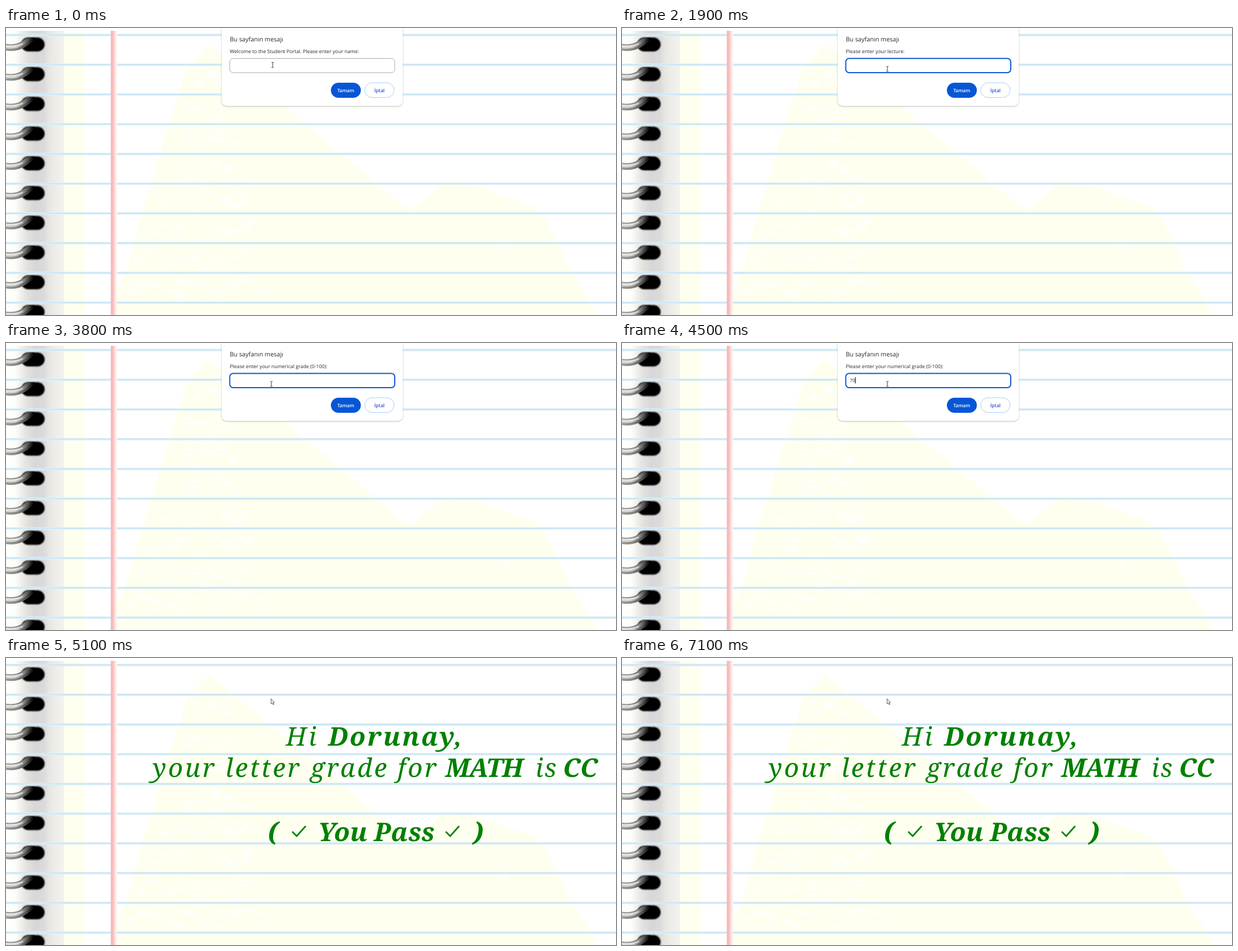
Recreate the animation shown at these times as an HTML page. Size 1089 px wide and 514 px high, loop 7.2 s.

```html
<!DOCTYPE html>
<html lang="tr">
<head>
<meta charset="utf-8">
<title>Student Portal</title>
<style>
  html, body { margin: 0; width: 100%; height: 100%; overflow: hidden; background: #fff; }
  svg { display: block; width: 100%; height: 100%; }
  text { text-rendering: geometricPrecision; white-space: pre; }
  .ui { font-family: "Open Sans", "Noto Sans", sans-serif; fill: #26282b; }
  .button { font-size: 8.5px; font-weight: 600; text-anchor: middle; }
  .note { font: italic 46px "Noto Serif", "Liberation Serif", serif; fill: #008000; text-anchor: middle; }
  .bold { font-weight: 700; }
</style>
</head>
<body>
<svg viewBox="0 0 1089 514" preserveAspectRatio="none">
  <defs>
    <linearGradient id="spine" gradientUnits="userSpaceOnUse" x1="0" x2="104" y1="0" y2="0">
      <stop offset="0" stop-color="#fff"/>
      <stop offset=".17" stop-color="#fdfdf8"/>
      <stop offset=".24" stop-color="#f3f2ed"/>
      <stop offset=".36" stop-color="#e3e2de"/>
      <stop offset=".5" stop-color="#d8d6d8"/>
      <stop offset=".66" stop-color="#dbdbd9"/>
      <stop offset=".75" stop-color="#e9e8e4"/>
      <stop offset="1" stop-color="#f3f3ef"/>
    </linearGradient>
    <linearGradient id="margin">
      <stop offset="0" stop-color="#f9b9b9"/>
      <stop offset=".45" stop-color="#fbbdbd"/>
      <stop offset=".6" stop-color="#fbdcd8"/>
      <stop offset="1" stop-color="#fff6f2"/>
    </linearGradient>
    <linearGradient id="ringEdge" gradientUnits="userSpaceOnUse" x1="0" x2="50" y1="0" y2="0">
      <stop offset="0" stop-color="#9a9a98"/>
      <stop offset=".4" stop-color="#858583"/>
      <stop offset=".75" stop-color="#494948"/>
      <stop offset="1" stop-color="#000"/>
    </linearGradient>
    <linearGradient id="ringShine" gradientUnits="userSpaceOnUse" x1="0" x2="48" y1="0" y2="0">
      <stop offset="0" stop-color="#d6d6d4"/>
      <stop offset=".35" stop-color="#d0d0ce"/>
      <stop offset=".65" stop-color="#8b8b89"/>
      <stop offset="1" stop-color="#111"/>
    </linearGradient>
    <filter id="soft" x="-20%" y="-20%" width="140%" height="140%">
      <feGaussianBlur stdDeviation=".8"/>
    </filter>
    <filter id="shadow" x="-5%" y="-10%" width="110%" height="120%">
      <feDropShadow dx="0" dy="1" stdDeviation="1.3" flood-color="#55553c" flood-opacity=".45"/>
    </filter>
    <clipPath id="ringClip">
      <path d="M-5 20H27V17H56A13 13 0 0 1 56 42H-5Z"/>
    </clipPath>
    <g id="hole">
      <rect x="27" y="17" width="42" height="25" rx="12.5" filter="url(#soft)"/>
      <g clip-path="url(#ringClip)" fill="none">
        <path d="M-4 34C14 37 28 36 48 15" stroke="url(#ringEdge)" stroke-width="12"/>
        <path d="M-4 33C14 36 27 34 45 16" stroke="url(#ringShine)" stroke-width="6"/>
        <path d="M-4 32C12 34 22 33 30 28" stroke="#f4f4f2" stroke-width="1.5" opacity=".8"/>
      </g>
    </g>
  </defs>

  <rect width="1089" height="514" fill="#fff"/>
  <g id="paper">
    <rect x="104" y="5" width="37" height="509" fill="#fffff0"/>
    <path fill="#fffff0" d="M362 29L323 70L310 115L278 213L265 262L243 328L228 385L216 430L198 470V514H1055L1040 485L1008 435L983 380L959 334L945 320L845 284L787 272L720 327L590 218Z"/>
    <ellipse cx="890" cy="394" rx="6" ry="4" fill="#fff"/>
    <g id="flecks" stroke="#fff" stroke-linecap="round" fill="none"/>
    <rect y="5" width="104" height="509" fill="url(#spine)"/>
    <path d="M78 5V514" stroke="#f3e3da"/>
    <g id="rules"/>
    <rect x="187" y="5" width="11" height="509" fill="url(#margin)"/>
    <g id="holes"/>
  </g>

  <g id="result">
    <text class="note" x="529" y="157" letter-spacing="4">Hi</text>
    <text class="note bold" x="696" y="157" letter-spacing="3"><tspan id="greeted"></tspan>,</text>
    <text class="note" x="517" y="213" letter-spacing="3.6">your letter grade for</text>
    <text class="note bold" x="853" y="213" letter-spacing="-1.5">MATH</text>
    <text class="note" x="965" y="213" letter-spacing="2">is</text>
    <text class="note bold" x="1025" y="213">CC</text>
    <text class="note bold" x="477" y="328">(</text>
    <text class="note bold" x="661" y="328">You Pass</text>
    <text class="note bold" x="843" y="328">)</text>
    <path d="M511 311L519 319L535 301M785 311L793 319L809 301" fill="none" stroke="#008000" stroke-width="2.8"/>
  </g>

  <g id="dialog" class="ui">
    <rect x="385" y="-20" width="323.5" height="159.5" rx="9" fill="#fff" filter="url(#shadow)"/>
    <text x="399.5" y="24" font-size="10.95" font-weight="500">Bu sayfanın mesajı</text>
    <text id="prompt" x="399.5" y="45" font-size="8.83"></text>
    <rect id="field" x="399.5" y="54.5" width="294.5" height="25.5" rx="6" fill="#fff"/>
    <text id="typed" x="406.7" y="70.3" font-size="8.3"></text>
    <path id="caret" d="M.5 61V72.5" stroke="#111" stroke-width="1"/>
    <rect x="580" y="98" width="53.5" height="27" rx="13.5" fill="#0656d6"/>
    <text class="button" x="606.5" y="114.6" fill="#fff" style="fill:#fff">Tamam</text>
    <rect x="640.5" y="98" width="52.5" height="26.5" rx="13.25" fill="#fff" stroke="#a9c8fa"/>
    <text class="button" x="666.7" y="114.6" style="fill:#2f50cc">İptal</text>
  </g>

  <path id="beam" d="M-2 -4.5H-.5L0 -4L.5 -4.5H2M0 -4V4M-2 4.5H-.5L0 4L.5 4.5H2" fill="none" stroke="#222" stroke-width=".9"/>
  <path id="arrow" d="M473.2 73V82.2L475.3 80.3L476.8 83.6L478.2 83L476.8 79.8H479.3Z" fill="#fff" stroke="#333" stroke-width=".8"/>
</svg>
<script>
const $ = id => document.getElementById(id);
const LOOP = 7200, PITCH = 53.25, ROWS = 10;
const NAME = "Dorunay";
const PROMPTS = [
  "Welcome to the Student Portal. Please enter your name:",
  "Please enter your lecture:",
  "Please enter your numerical grade (0-100):"
];

// Each step: start time, prompt index, typed text, caret shown
const STEPS = [
  [0, 0, "", false],
  [100, 0, "", true],
  [200, 0, NAME.slice(0, 1), true],
  [300, 0, NAME.slice(0, 2), true],
  [600, 0, NAME.slice(0, 3), true],
  [700, 0, NAME.slice(0, 4), true],
  [800, 0, NAME.slice(0, 5), true],
  [900, 0, NAME, true],
  [1400, 1, "", true],
  [1900, 1, "", false],
  [2400, 1, "M", true],
  [2500, 1, "MA", true],
  [2700, 1, "MAT", true],
  [2900, 1, "MATH", true],
  [3200, 2, "", true],
  [3800, 2, "", false],
  [4300, 2, "", true],
  [4400, 2, "7", true],
  [4500, 2, "70", true]
];
const FOCUS_AT = 100, CLOSE_AT = 5000, RESULT_AT = 5100;

function seeded(seed) {
  return () => (seed = (seed * 16807) % 2147483647) / 2147483647;
}

function buildPaper() {
  const rand = seeded(77);
  let rules = "", holes = "", flecks = "";
  for (let i = 0; i < ROWS; i++) {
    const top = i * PITCH;
    rules += `<rect y="${top + 10.4}" width="1089" height="4.4" fill="#e2f1f8"/>` +
             `<rect y="${top + 11.3}" width="1089" height="2.2" fill="#c9e6f5"/>`;
    holes += `<use href="#hole" y="${top}"/>`;
    if (i < 1 || i > 8) continue;
    const left = 352 - i * 18, right = 372 + i * 11;
    for (let n = 0; n < 6 + i * 3; n++) {
      const x = left + rand() * (right - left), y = top + 24 + rand() * 34;
      flecks += `<path d="M${x} ${y}q5 ${rand() * 4 - 2} ${4 + rand() * 13} ${rand() * 3}" stroke-width="${2 + rand() * 2.2}"/>`;
    }
  }
  $("rules").innerHTML = rules;
  $("holes").innerHTML = holes;
  $("flecks").innerHTML = flecks;
}

function show(id, on) {
  $(id).style.display = on ? "" : "none";
}

function draw(t) {
  const [, prompt, text, caret] = STEPS.findLast(step => step[0] <= t);
  const focused = t >= FOCUS_AT, open = t < CLOSE_AT;
  show("dialog", open);
  show("beam", open);
  show("arrow", !open);
  show("result", t >= RESULT_AT);
  if (!open) return;

  $("prompt").textContent = PROMPTS[prompt];
  $("typed").textContent = text;
  $("field").setAttribute("stroke", focused ? "#0b57d0" : "#a8a8a8");
  $("field").setAttribute("stroke-width", focused ? 2 : 1);
  show("caret", caret);
  const end = text ? $("typed").getComputedTextLength() : 0;
  $("caret").setAttribute("transform", `translate(${Math.round(406.7 + end)} 0)`);
  $("beam").setAttribute("transform", focused ? "translate(473.8 73.3)" : "translate(476 66)");
}

buildPaper();
$("greeted").textContent = NAME;
const start = performance.now();
function tick() {
  draw((performance.now() - start) % LOOP);
  requestAnimationFrame(tick);
}
tick();
</script>
</body>
</html>
```
